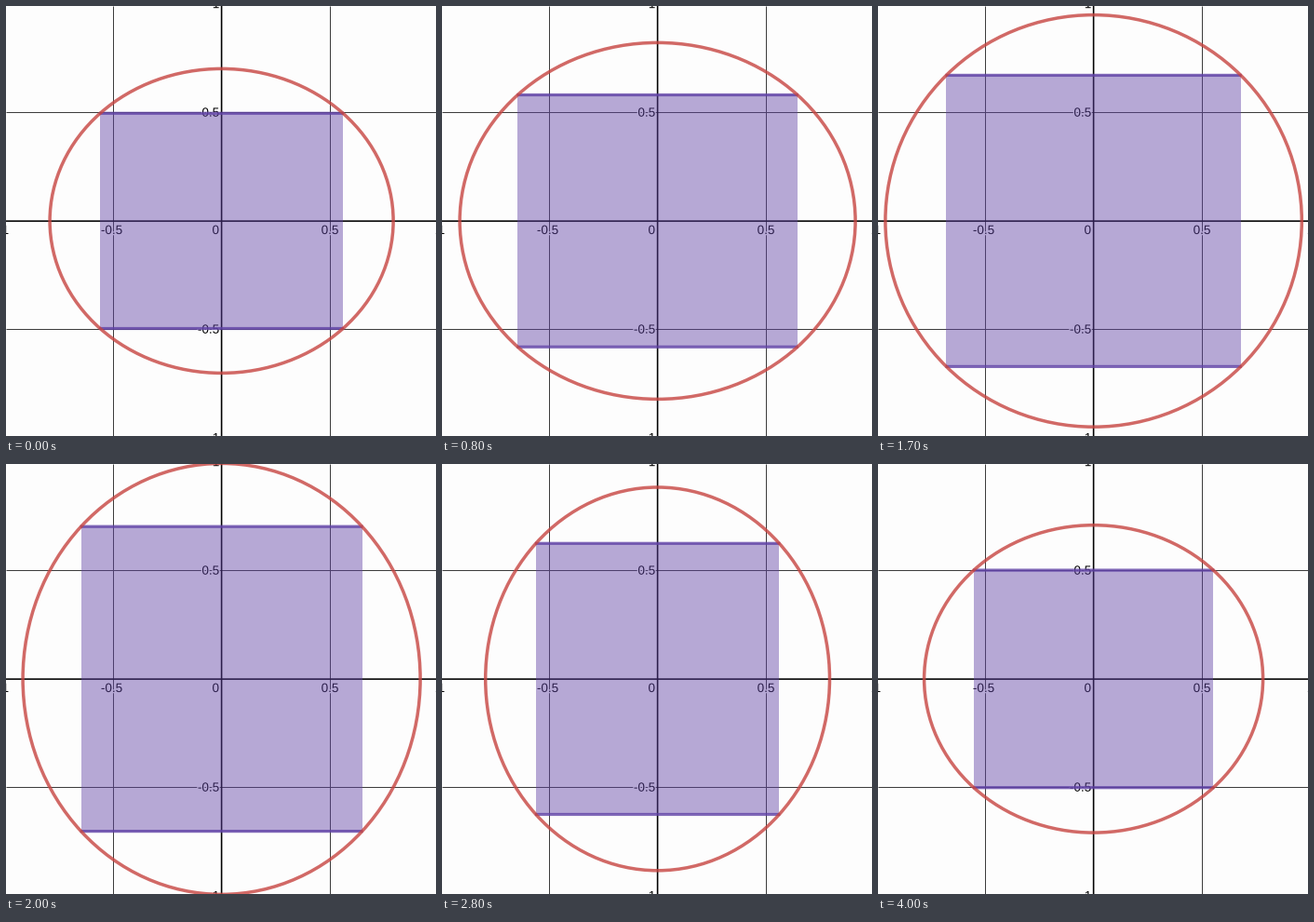
A matplotlib script that plays this animation: 462x462 px, repeating every 4100 ms.

```python
import numpy as np
import matplotlib.pyplot as plt
from matplotlib.animation import FuncAnimation
from matplotlib.patches import Ellipse, Rectangle
from matplotlib.patheffects import withStroke

SIZE, DPI = 462, 100
FRAMES, INTERVAL = 41, 100
CX, CY, UNIT = 231.6, 230.9, 233
LOW, SPAN = 0.7 * UNIT, 0.3 * UNIT
LEAD = 21  # the horizontal radius runs ahead of the vertical one

PURPLE, RED = "#6042a6", "#c74440"
PX = 72 / DPI

# Travel of the slider in pixels, slightly uneven in time
KEY_FRAMES = [0, 8, 12, 13, 20, 24, 33, 40, 41]
KEY_TRAVEL = [0.4, 28.4, 42.1, 44.6, 68.4, 83.1, 114.4, 137.7, 140.2]


def radius(travel):
    """Bounce linearly between LOW and LOW + SPAN."""
    return LOW + SPAN - abs(travel % (2 * SPAN) - SPAN)


fig = plt.figure(figsize=(SIZE / DPI, SIZE / DPI), dpi=DPI, facecolor="#fdfdfd")
ax = fig.add_axes([0, 0, 1, 1])
ax.set_xlim(0, SIZE)
ax.set_ylim(SIZE, 0)
ax.axis("off")


def line(color, width, alpha=1.0, z=1, snap=False):
    return ax.plot([], [], color=color, lw=width * PX, alpha=alpha, zorder=z,
                   snap=snap, solid_capstyle="butt")[0]


def label(x, y, text, align):
    ax.text(x, y, text, ha=align, va="baseline", family="Liberation Sans",
            fontsize=13.5 * PX, color="black", zorder=2, clip_on=True,
            path_effects=[withStroke(linewidth=2.5 * PX, foreground="#fdfdfd")])


# Grid, axes and labels
for value in (-0.5, 0.5):
    gx, gy = CX + value * UNIT, CY - value * UNIT
    line("#3c3c3c", 1, snap=True).set_data([gx, gx], [0, SIZE])
    line("#3c3c3c", 1, snap=True).set_data([0, SIZE], [gy, gy])
line("black", 1.6, z=3).set_data([CX, CX], [0, SIZE])
line("black", 1.6, z=3).set_data([0, SIZE], [CY + 0.2, CY + 0.2])

for value, text in ((-1, "-1"), (-0.5, "-0.5"), (0.5, "0.5"), (1, "1")):
    shift = -1.5 if value < 0 else 0
    label(CX + value * UNIT + shift, 245, text, "center")
    label(229.3, CY - value * UNIT + 4.3, text, "right")
label(229, 245, "0", "right")

# Moving shapes
fill = ax.add_patch(Rectangle((0, 0), 1, 1, fc=PURPLE, ec="none", alpha=0.45,
                              zorder=4))
edges = [line(PURPLE, 3.2, 0.8, 5) for _ in range(2)]
sides = [line(PURPLE, 2.2, 0.7, 5) for _ in range(2)]
oval = ax.add_patch(Ellipse((CX, CY), 1, 1, fc="none", ec=RED, alpha=0.8,
                            lw=3.5 * PX, zorder=6))


def update(frame):
    travel = np.interp(frame, KEY_FRAMES, KEY_TRAVEL)
    a, b = radius(travel + LEAD), radius(travel)
    oval.set_width(2 * a)
    oval.set_height(2 * b)

    w, h = a / np.sqrt(2), b / np.sqrt(2)
    fill.set_bounds(CX - w, CY - h, 2 * w, 2 * h)
    for sign, edge, side in zip((-1, 1), edges, sides):
        edge.set_data([CX - w - 1, CX + w + 1], [CY + sign * h] * 2)
        side.set_data([CX + sign * w] * 2, [CY - h, CY + h])
        # the sides get an outline only close to the grid lines
        side.set_visible(abs(w - UNIT / 2) < 2.2)
    return [fill, oval, *edges, *sides]


anim = FuncAnimation(fig, update, frames=FRAMES, interval=INTERVAL,
                     init_func=lambda: update(0), repeat=True, repeat_delay=0)
plt.show()
```
